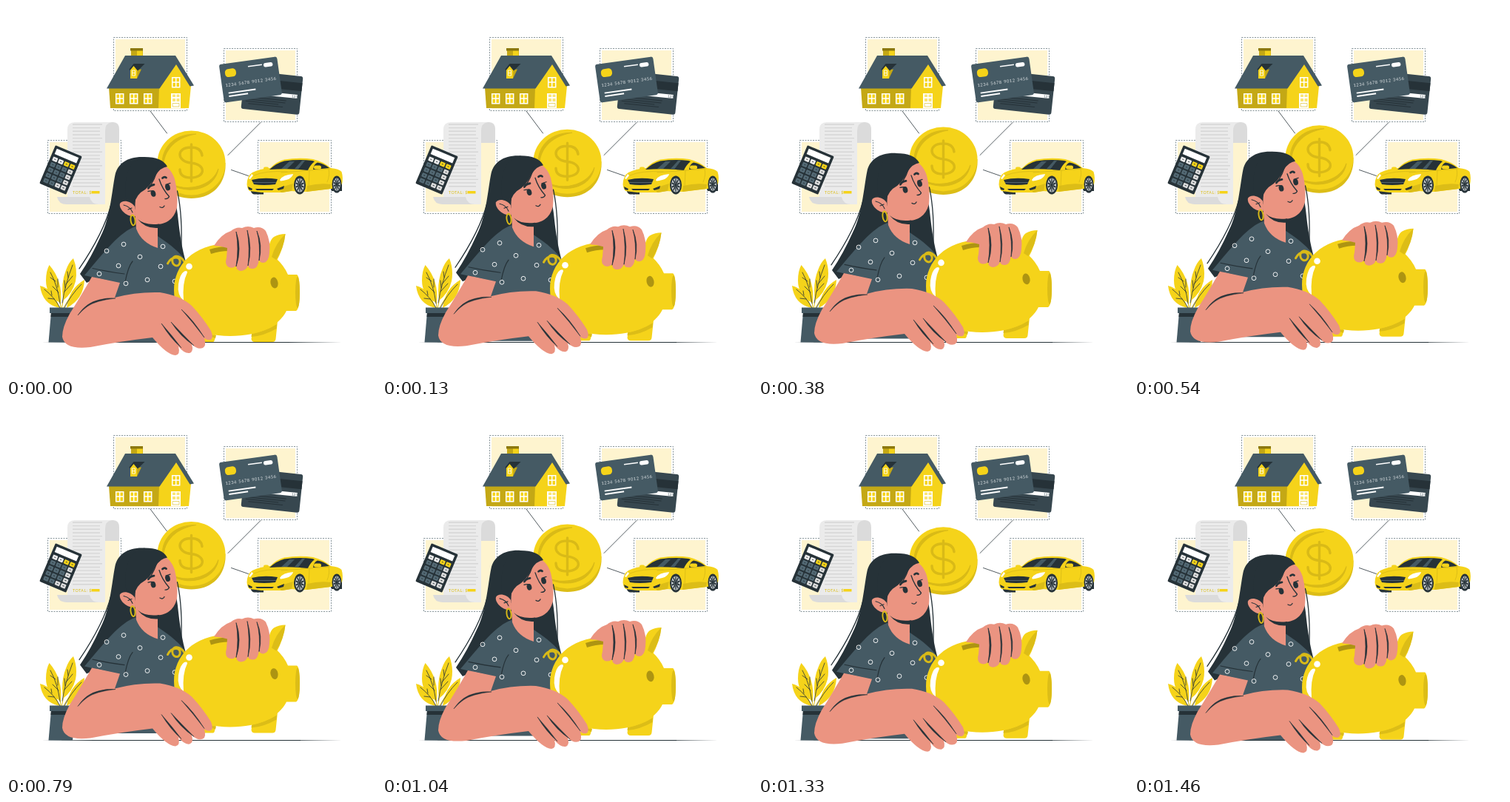
These frames come from a looping animation (500 by 500 pixels, 1.5 s). An HTML page:

```html
<!DOCTYPE html>
<html lang="en">
<head>
<meta charset="utf-8">
<title>Savings</title>
<style>
  html, body { margin: 0; width: 100%; height: 100%; overflow: hidden; background: #fff; }
  svg { display: block; width: 500px; height: 500px; }
  .y { fill: #f5d31a } .m { fill: #c4a815 } .o { fill: #dcbd17 }
  .s { fill: #455a64 } .d { fill: #263238 } .k { fill: #eb9481 } .w { fill: #fff }
  .line { fill: none; stroke: #263238; stroke-linecap: round; stroke-linejoin: round }
  .gold { fill: none; stroke: #d9ba17; stroke-linecap: round }
  .white { fill: none; stroke: #fff }
  text { font-family: Lato, sans-serif }
</style>
</head>
<body>
<svg viewBox="0 0 500 500">
  <g id="boxes"></g>

  <!-- house -->
  <path class="m" d="M139 110H208V138H141Z"/>
  <path class="y" d="M206 138L207 110 230 78 250 108 247 138Z"/>
  <path class="s" d="M161 67H229L254 107.5 248.500 108.500 230 79 207.500 111.500H136Z"/>
  <path class="m" d="M169 60H185V67H169Z"/><path class="y" d="M177 60H184.500V67H177Z"/>
  <path d="M168 57H185V60.500H168Z" fill="#8c780f"/>
  <path class="y" d="M168 98V86L172.500 80 177 86V98Z"/><path class="m" d="M177 86L183 85.500 177 98Z"/>
  <path class="d" d="M172.500 78H187.500L178 87.500 172.500 81 167.500 87 166.500 85.500Z"/>
  <path class="white" d="M170.500 87H174.500V94H170.500ZM170.500 90.500H174.500" stroke-width=".8"/>
  <g id="windows" class="white" stroke-width="1.500"></g>
  <path class="w" d="M223 118H236V138H223Z"/>
  <path class="y" d="M225 119.500h4v3.500h-4zM230.500 119.500h4v3.500h-4zM225 125h4v4h-4zM230.500 125h4v4h-4z" opacity=".6"/>
  <path class="gold" d="M225.500 131.500H234V136H225.500Z" stroke-width=".6"/>

  <!-- cards -->
  <g transform="translate(359.500 117) rotate(6)">
    <rect x="-39.500" y="-26" width="79" height="52" rx="3" fill="#37474f"/>
    <path class="d" d="M-39.500 -17H39.500V-6H-39.500Z"/>
    <path class="w" d="M-20 -.5H34.500V4.500H-20Z"/>
    <text x="27" y="3.800" font-size="4.500" fill="#455a64">123</text>
    <path class="line" d="M-34 9H20M-34 12H19M-34 15H10M-30 18H16" stroke-width="1"/>
  </g>
  <g transform="translate(330.500 99.500) rotate(-8)">
    <rect class="s" x="-39.500" y="-26" width="79" height="52" rx="3"/>
    <rect class="y" x="-33" y="-18.500" width="15" height="11" rx="4.500"/>
    <rect class="w" x="20" y="-19.500" width="12.500" height="5.500" rx="2.700"/>
    <path class="white" d="M-1 -18H18" stroke-width="1.500"/>
    <path class="white" d="M-32 13.800H5M-32 18.200H-6" stroke-width="2"/>
    <text x="0" y="5" font-size="5.800" letter-spacing=".5" word-spacing=".6" text-anchor="middle" fill="#dfe3e5">1234 5678 9012 3456</text>
  </g>

  <!-- receipt and calculator -->
  <path d="M130 157H145Q153 157 153 167V185H134V168Z" fill="#dbdbdb"/>
  <path d="M83 268V167Q83 157 93 157H143Q134 158 134 169V268Z" fill="#ebebeb"/>
  <path d="M69 258H113Q115 268 126 268H82Q71 268 69 258Z" fill="#dbdbdb"/>
  <path id="rows" d="" fill="none" stroke="#d6d6d6" stroke-width="1.400"/>
  <text x="90" y="253.500" font-size="5.500" letter-spacing=".4" fill="#dcbd17">TOTAL: $</text>
  <path class="y" d="M115.500 250H126.500V253.500H115.500Z"/>
  <g id="calc" transform="translate(74 221.500) rotate(22.800)">
    <rect class="d" x="-19.500" y="-28" width="39" height="56" rx="1.500"/>
    <path class="w" d="M-16 -24.500H16V-16.500H-16Z"/>
  </g>

  <!-- car -->
  <path class="d" d="M330 247H348V254.500H335Q331 254 330 247Z"/>
  <path class="d" d="M436 236H454V250H440Z"/>
  <path class="y" d="M325.500 241Q326 229 333 225Q343 220 357 219Q366 210 376 207.500Q396 204.500 415 207Q428 210 439 219Q450 220 453.500 224Q456 232 454 241L440 247 406 251 384 250 374 252H345L329 250Q326 247 325.500 241Z"/>
  <path class="o" d="M407 243Q424 239 439 241L438 247 406 251ZM368 246L388 240 386 250 372 252Z"/>
  <path class="d" d="M356 221Q366 212 376 209.500Q396 207 414 209L417 210Q411 215 408 222Q382 219 356 221Z"/>
  <path class="d" d="M415 221Q416 213 421 211.500Q430 213 437 219Z"/>
  <path d="M372 220L383 210H390L380 220ZM390 220L400 209H404L395 220.500Z" fill="#455a64"/>
  <path class="gold" d="M335 229Q350 222 380 224M372 225Q400 223 438 220M410 222L409 246M436 220Q438 229 434 238" stroke-width=".8"/>
  <rect class="y" x="348" y="217.500" width="7" height="4" rx="2"/>
  <rect class="y" x="416" y="215.500" width="10" height="5" rx="2.500"/>
  <path class="d" d="M332 235Q348 231 367 234L364 241Q348 243 335 241Z"/>
  <path d="M334 238.500H365" stroke="#607079" stroke-width=".8"/>
  <path class="w" d="M370 235Q374 228 388 227Q386 235 371 236.500ZM328 233L332 227 334 229 330 234Z"/>
  <path class="d" d="M327 244L333 247 332 249 328 248ZM376 243L366 247 368 249 375 247ZM337 247H362L360 249H339Z"/>
  <g id="wheels"></g>

  <!-- links, table and plant -->
  <path class="line" d="M195 142L217.500 172M344 157.500L300 201.500M304.500 221.500L327.500 229.500" stroke-width=".8"/>
  <path class="d" d="M48 454.500L120 453.900H380L454 454.500 380 455H120Z"/>
  <path class="line" d="M74 409Q73 385 63 362M75 409Q79 384 88 357M74 409Q66 399 55 387M77 409Q85 394 98 379" style="stroke:#dcbd17"/>
  <path class="y" d="M73 401Q54 391 54 371Q54 358 58.500 350Q77 371 74 401ZM77 398Q74 374 81 357Q85 346 91 341Q97 356 94 372Q90 388 77 398ZM72 408Q49 403 46 378Q65 383 72 408ZM82 408Q85 382 106 370Q105 396 82 408Z"/>
  <path class="line" d="M73 402Q70 378 60 360M71 387L63 379M70 380V369M67 372L60 367M76 401Q80 376 90 350M79 386L89 375M81 376L90 365M80 381L79 371M84 367L83 359M73 408Q66 394 52 383M65 396L57 395M62 391L61 385M79 408Q87 391 102 376" stroke-width=".8"/>
  <path class="s" d="M61 414H94L90 454.500H57.500Z"/>
  <path class="d" d="M61 414H94V420H60.500Z"/>
  <path class="s" d="M59 407.500H96V415H59Z"/>

  <g id="float">
    <!-- coin -->
    <path class="o" d="M204.500 212V219C208 246 227 260 250.500 260S294 246 296.500 219V212Z"/>
    <ellipse class="y" cx="250.500" cy="212" rx="46" ry="43.500"/>
    <path class="gold" d="M213 224C206 198 222 173 257 173C226 178 210 198 213 224ZM221 240C246 256 282 248 287 220C280 241 250 253 221 240Z" stroke-width="1.100" style="fill:#d9ba17"/>
    <path class="gold" d="M265 202C264 194 258 191 250 191C230 191 230 210 250 212C271 214 270 232 250 232C241 232 235 229 235 221M250.500 187V237" stroke-width="3.400"/>

    <!-- back hair -->
    <path class="d" d="M187 204C164 203 151 213 147.500 228C143 250 141 286 128 311Q115 340 100 362L109 374 160 350 215 345 243 346Q236 322 232 282L229 262Z"/>
    <path class="line" d="M142 268C134 300 116 330 99 355M231.500 250Q239 285 236.500 332" stroke-width="1.300"/>

    <!-- shirt and neck -->
    <path class="s" d="M175 298C154 305 134 331 106 364L150 374 140 396V454.500H245V348C236 333 223 323 205 311Z"/>
    <path class="k" d="M174 275L176 301Q183 320 205 327V288Z"/>
    <path class="line" d="M117 354.500Q137 359 160 362M171 345Q165 352 161 373" stroke-width="1.200"/>
    <g id="dots" class="white" stroke-width=".9"></g>

    <!-- head -->
    <path class="k" d="M176 233L208 214Q222 216 228 234Q233 254 231 272C227 290 214 295 203 295C190 295 179 290 174 281Z"/>
    <path class="d" d="M178 288Q188 297 207 294.500L205 300Q188 301 178 288Z"/>
    <path class="d" d="M187 204Q211 204 218 217Q209 218 202 229Q196 244 182 252Q173 260 173 274L163 265Q157 230 172 211Z"/>
    <path class="line" d="M205 219Q202 234 192 247" stroke-width="1.300"/>
    <path class="k" d="M174 271C168 262 156 262 154 267C152 274 163 286 175 284Z"/>
    <path class="line" d="M159 269Q168 271 171 279M165 275L170 273" stroke-width="1.100"/>
    <ellipse class="gold" cx="171.500" cy="289.500" rx="3" ry="7" stroke-width="1.900" transform="rotate(-8 171.500 289.500)"/>
    <path class="line" d="M192.500 246Q195 242 200 241.500M211.500 232.500Q214 230 216.500 232" stroke-width="2.800"/>
    <ellipse class="d" cx="199" cy="253.500" rx="3.300" ry="4.300" transform="rotate(-15 199 253.500)"/>
    <ellipse class="d" cx="218.500" cy="245" rx="3.300" ry="4.500" transform="rotate(-15 218.500 245)"/>
    <path class="line" d="M192 250.500Q195 249.500 199 250M216 241.500L222 239.500" stroke-width="1.300"/>
    <path class="line" d="M207 234Q211 247 220.500 257.500Q219 261 215 260.500M208 271.500Q212 274 214 270" stroke-width="1.300"/>

    <!-- piggy bank -->
    <path class="gold" d="M243 354C243 341 229 333 225 342C223 350 233 355 235 347C237 338 224 337 218.500 348" stroke-width="3"/>
    <path class="y" d="M334 434L331.500 450Q332 454 336 454H360Q364 454 364.500 450L367 426ZM262 436V454H280Q282 454 283 446L285 436Z"/>
    <path class="o" d="M332 443Q350 440 366 430L365.500 436Q348 446 331.500 447ZM268 444L284 445 283 449Z"/>
    <path class="y" d="M227 384C227 350 253 322 300 321C327 320 349 329 364 340Q376 351 381 363H393Q397 365 397 387T392 412H379C369 432 343 446 303 446C257 446 227 424 227 384Z"/>
    <ellipse class="o" cx="394" cy="387" rx="3" ry="21"/>
    <path class="y" d="M351 333C356 326 356 316 362 312Q369 308 377.500 308Q375 328 365 346Z"/>
    <path class="o" d="M359 339Q364 321 377.500 308Q376 326 365 343Z"/>
    <ellipse cx="362.500" cy="374" rx="5" ry="7.500" transform="rotate(-12 362.500 374)" fill="#ad9412"/>
    <path d="M275 329Q287 325 301 325V331Q289 331 277 335Z" fill="#ad9412"/>
    <circle class="w" cx="247.500" cy="352" r="4.300"/>
    <path class="w" d="M245 360Q238 374 240 398Q231 391 233 376Q235 362 241 358.500Q245 357 245 360Z"/>

    <!-- hand on the bank -->
    <path class="k" d="M281 324Q291 308 304 304Q311 298 319 300Q327 296 335 300Q345 297 351 304Q358 318 356 334Q355 346 348 347Q343 347 342 343Q340 356 333 355Q328 355 327 351Q324 358 317 358Q311 357 311 351Q307 355 301 353Q295 350 298 340L299 327Q290 324 281 324Z"/>
    <path class="d" d="M311 305Q319 328 311 352Q315 328 311 305ZM326 303Q333 327 327 351Q330 328 326 303ZM339 304Q347 323 342 344Q344 322 339 304Z" stroke="#263238" stroke-width=".7"/>

    <!-- resting arm -->
    <path class="k" d="M116 366L154 374 147 394Q176 386 208 387Q235 391 251 405Q266 421 277 439Q281 449 276 451Q272 452 268 449Q271 460 266 462Q259 465 251 457Q254 467 248 469Q241 470 233 460Q236 471 229 472Q217 471 198 448Q155 453 114 461Q79 465 76 447Q76 434 86 416Q100 394 116 366Z"/>
    <path class="d" d="M97 418Q108 401 126 397Q137 394 148 395Q121 398 110 406Q104 410 97 418ZM210 429Q225 446 237 462Q222 449 210 429ZM223 427Q239 444 254 459Q235 446 223 427ZM237 410Q253 424 268 448Q253 428 237 410Z" stroke="#263238" stroke-width=".5"/>
  </g>
</svg>
<script>
  const $ = id => document.getElementById(id);
  const range = n => [...Array(n).keys()];
  const fill = (id, items, draw) => $(id).insertAdjacentHTML('beforeend', items.map(draw).join(''));

  fill('boxes', [[145, 42], [294, 57], [56, 181], [340, 181]], ([x, y]) =>
    `<rect x="${x + 3}" y="${y + 3}" width="94" height="94" fill="#fef4cf"/>
     <rect x="${x + .5}" y="${y + .5}" width="99" height="99" fill="none" stroke="#455a64" stroke-width=".65" stroke-dasharray="2 1.500"/>`);

  fill('windows', [[148, 118], [167, 118], [186, 118], [224, 96]], ([x, y]) =>
    `<path class="y" d="M${x + .7} ${y + .7}h10v13h-10zM${x + 5.7} ${y}v14M${x} ${y + 7}h11"/>`);

  $('rows').setAttribute('d', range(19).map(i => `M90 ${160 + i * 4.65}h${i % 4 ? 37 : 40}`).join(''));

  fill('calc', range(20), i => {
    const col = i % 4, row = i >> 2;
    const color = !row ? (col < 2 ? '#ebebeb' : '#f5d31a') : col == 3 || (row == 4 && col == 2) ? '#dbdbdb' : '#546a75';
    return `<rect x="${-16 + col * 8.4}" y="${-13 + row * 7.8}" width="6.800" height="5.800" rx="1" fill="${color}"/>
      <path d="M${-13.6 + col * 8.4} ${-10.1 + row * 7.8}h2" stroke="#263238" stroke-width=".9"/>`;
  });

  fill('wheels', [[397, 242, 8, 12.5], [447, 241, 6.5, 11.5]], ([x, y, rx, ry]) =>
    `<g transform="translate(${x} ${y}) scale(${rx / 10} ${ry / 10})">
      <circle class="d" r="10"/><circle r="7.500" fill="#c8ced1"/>` +
    range(10).map(i => `<path d="M0 -2V-7" stroke="#263238" stroke-width="1.700" transform="rotate(${i * 36})"/>`).join('') +
    '<circle class="d" r="2"/></g>');

  fill('dots', [[159, 322], [136, 331], [181, 339], [212, 325], [209, 352], [152, 351], [126, 362], [162, 375], [191, 370], [228, 372]],
    ([x, y]) => `<circle cx="${x}" cy="${y}" r="2.900"/>`);

  const PERIOD = 1500, LIFT = 10;
  function frame(now) {
    const phase = now % PERIOD / PERIOD;
    const lift = LIFT * (1 - Math.abs(1 - 2 * phase));
    $('float').setAttribute('transform', `translate(0 ${-lift})`);
    requestAnimationFrame(frame);
  }
  frame(performance.now());
</script>
</body>
</html>
```
